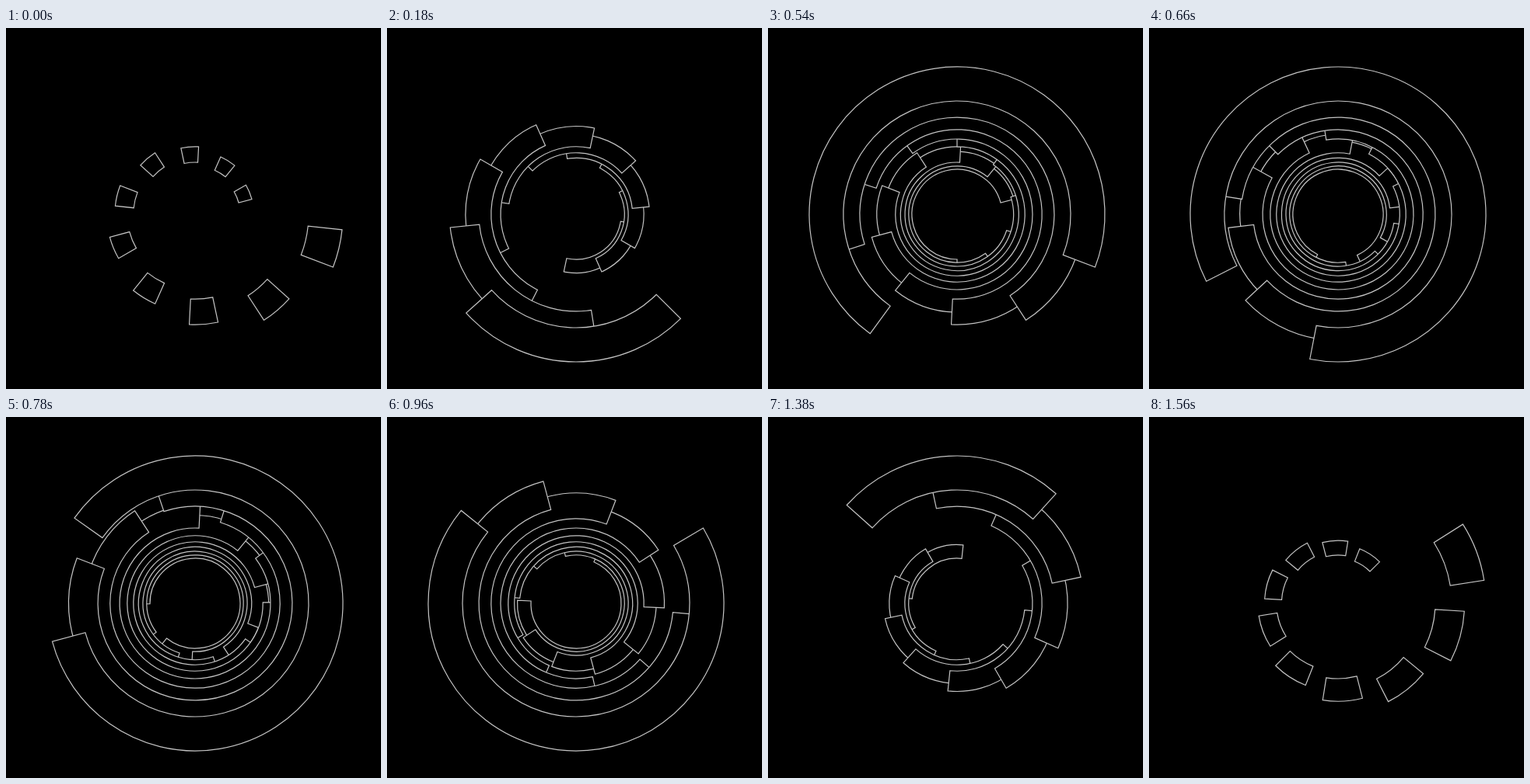
Animation, 482 px wide and 465 px high, one loop 1.62 s. Source, as an HTML page with a canvas:

```html
<!DOCTYPE html>
<html lang="en">
<head>
<meta charset="utf-8">
<title>Ring tunnel</title>
<style>
  html, body { margin: 0; width: 100%; height: 100%; overflow: hidden; background: #000; }
  canvas { display: block; }
</style>
</head>
<body>
<canvas id="stage" width="482" height="465"></canvas>
<script>
const ctx = document.getElementById('stage').getContext('2d');
const LOOP = 1620, STEP = 60, TICKS = 120, RINGS = 10;
const CENTER = [243, 240], OUTER = 190, INNER = 146, SPACING = 0.1685;

function drawRing(index, from, to) {
  const scale = 1 / (1 + SPACING * index);
  const a = from * Math.PI / 180, b = to * Math.PI / 180;
  ctx.beginPath();
  ctx.arc(...CENTER, OUTER * scale, a, b);
  ctx.arc(...CENTER, INNER * scale, b, a, true);
  ctx.closePath();
  ctx.fill();
  ctx.stroke();
}

function draw(ms) {
  // The picture is held for one step and lands on whole ticks.
  const step = Math.floor((ms % LOOP) / STEP);
  const tick = Math.floor(step * STEP / LOOP * TICKS + 0.2);
  const turn = 6 + 3 * tick;
  const head = Math.min(15 + 6 * tick, 303 + 5 * (tick - 48), 360);
  const tail = Math.max(0, 360 / 70 * (tick - 49.55));

  ctx.fillStyle = '#000';
  ctx.strokeStyle = '#c4c4c4';
  ctx.lineWidth = 1.2;
  ctx.fillRect(0, 0, 482, 465);
  // Far rings first, so nearer ones cover them.
  for (let i = RINGS - 1; i >= 0; i--) {
    drawRing(i, turn + tail + 36 * i, turn + head + 36 * i);
  }
}

const start = performance.now();
function animate() {
  draw(performance.now() - start);
  requestAnimationFrame(animate);
}
animate();
</script>
</body>
</html>
```
